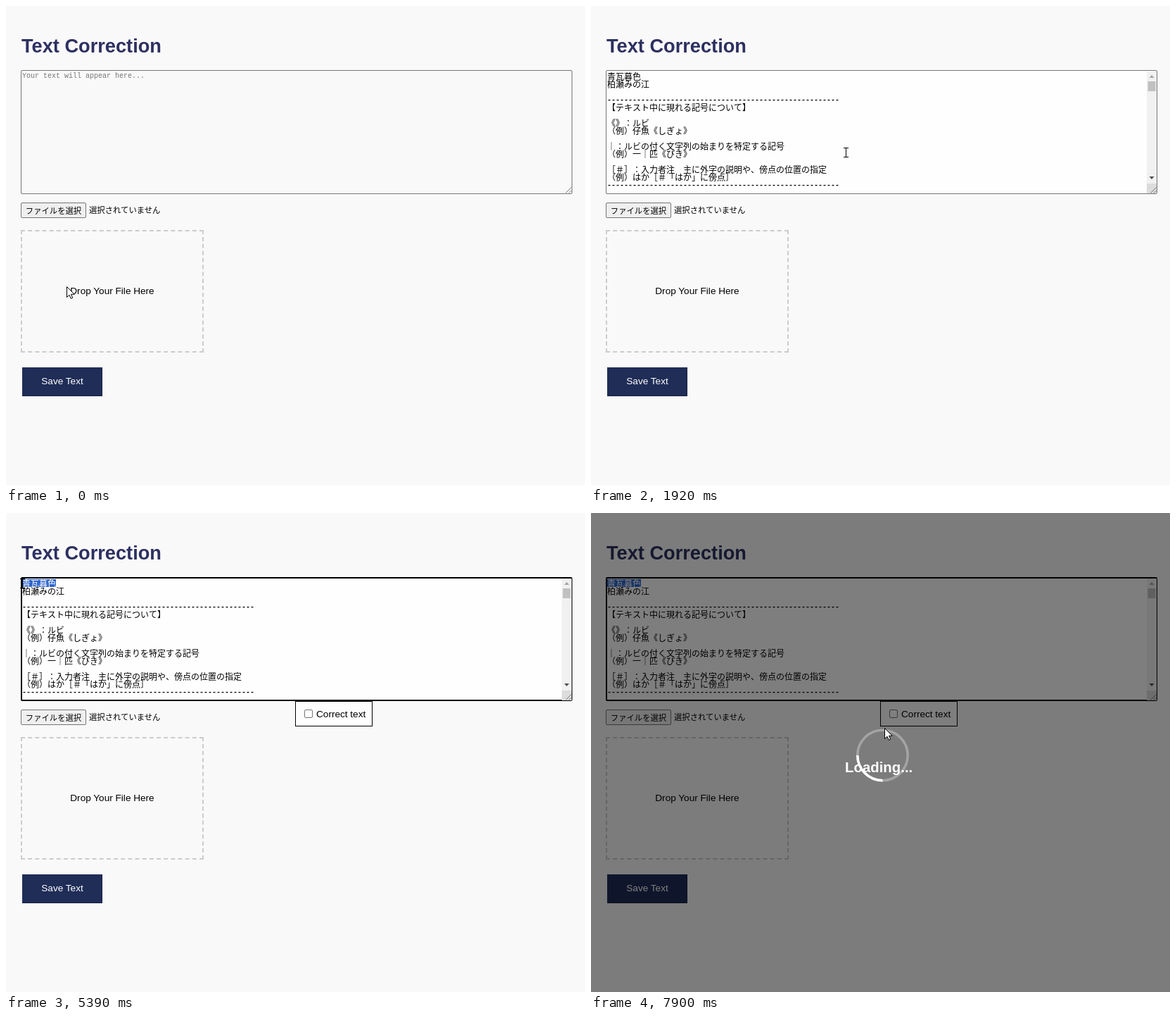
Animation of 823 by 680 pixels, one loop 8 s. Source, as an HTML page:

```html
<!DOCTYPE html>
<html lang="ja">
<head>
<meta charset="utf-8">
<title>Text Correction</title>
<style>
  html, body { margin: 0; width: 100%; height: 100%; overflow: hidden; background: #f9f9f9; }
  body { position: relative; color: #000; font: 13.6px "Liberation Sans", Arial, sans-serif; }
  body div, body svg { position: absolute; box-sizing: border-box; white-space: pre; }
  .ja { font-family: "Noto Sans CJK JP", "Noto Sans CJK", sans-serif; font-size: 11.35px; }
  .mono { font: 10px/11px "Liberation Mono", monospace; }

  #title { left: 22px; top: 36px; font-size: 27.2px; font-weight: bold; line-height: 41px; color: #2d3061; }
  #area { left: 21px; top: 91px; width: 784px; height: 176px; border: 1px solid #767676; border-radius: 2px; }
  #area.filled { background: #fefefe; }
  #area.focused { border: 2px solid #000; }
  #hint { left: 23px; top: 94px; color: #757575; }
  #text { left: 23px; top: 94px; font-size: 12px; line-height: 11px;
          font-kerning: none; text-spacing-trim: space-all; }
  #text div { left: 0; height: 11px; }
  #text .mono { font-weight: bold; }
  #text span { display: inline-block; width: 12px; height: 11px; }
  #text span.picked { background: #2f66cc; color: #fff; }

  #file { left: 21px; top: 279px; width: 93px; height: 22px; line-height: 20px; text-align: center;
          background: #efefef; border: 1px solid #767676; border-radius: 2px; }
  #status { left: 118px; top: 279px; line-height: 21px; }
  #drop { left: 21px; top: 318px; width: 260px; height: 174px; border: 2px dashed #ccc;
          line-height: 170px; text-align: center; }
  #save { left: 23px; top: 513px; width: 114px; height: 41px; line-height: 40px; text-align: center;
          background: #1f2d57; color: #fff; box-shadow: inset -1px -1px #162145; }

  #dialog { left: 218px; top: 0; width: 384px; height: 80px; background: #292a2d; color: #e8eaed;
            border-radius: 0 0 5px 5px; box-shadow: 0 1px 4px rgba(0, 0, 0, .5);
            font-family: "Open Sans", sans-serif; font-size: 10.75px; }
  #message { left: 14px; top: 7px; line-height: 20px; }
  #ok { left: 317px; top: 40px; width: 50px; height: 25px; line-height: 25px; text-align: center;
        background: #8ab4f8; color: #202124; border-radius: 3px;
        box-shadow: 0 0 0 1px #202124, 0 0 0 3px #5689dc; }

  #popup { left: 411px; top: 267px; width: 110px; height: 36px; background: #fdfdfd; border: 1px solid #000; }
  #box { left: 12px; top: 11px; width: 12px; height: 12px; border: 1px solid #767676; border-radius: 2px; background: #fff; }
  #label { left: 29px; top: 7px; line-height: 21px; }

  #overlay { inset: 0; background: rgba(0, 0, 0, .5); }
  #spinner { left: 376px; top: 306px; }
  #loading { left: 361px; top: 346px; line-height: 30px; font-size: 20.4px; font-weight: bold; color: #fff; }
  #cursor { left: 0; top: 0; overflow: visible; }
</style>
</head>
<body>
<div id="title">Text Correction</div>
<div id="area"></div>
<div id="hint" class="mono">Your text will appear here...</div>
<div id="text" class="ja"></div>
<svg style="left:790px;top:93px" width="14" height="173">
  <g id="scrollbar">
    <path fill="#f1f1f1" d="M0 0h14v159h-14z"/>
    <path fill="#c1c1c1" d="M1.5 14h11v14h-11z"/>
    <path fill="#a3a3a3" d="M3.5 9l3.5-4 3.5 4z"/>
    <path fill="#505050" d="M3.5 149l3.5 4 3.5-4z"/>
    <path fill="#dcdcdc" d="M0 159h14v14h-14z"/>
  </g>
  <path stroke="#777" d="M5.5 172.5l8-8M10 172.5l3.5-3.5"/>
</svg>
<div id="file" class="ja">ファイルを選択</div>
<div id="status" class="ja">選択されていません</div>
<div id="drop">Drop Your File Here</div>
<div id="save">Save Text</div>
<div id="popup"><div id="box"></div><div id="label">Correct text</div></div>
<div id="dialog"><div id="message">Detected encoding: SHIFT_JIS</div><div id="ok">OK</div></div>
<div id="overlay">
  <svg id="spinner" width="77" height="77" fill="none" stroke="#fff" stroke-width="3.6">
    <circle cx="38.5" cy="38" r="35.7" stroke-opacity=".3"/>
    <circle id="arc" cx="38.5" cy="38" r="35.7" pathLength="4" stroke-dasharray="1 3"/>
  </svg>
  <div id="loading">Loading...</div>
</div>
<svg id="cursor" width="1" height="1">
  <path id="arrow" fill="#fff" stroke="#000" d="M.5 .5V15.5L4 12.2L6.3 17.3L8.7 16.3L6.5 11.3H11.2Z"/>
  <path id="beam" fill="none" stroke="#000" d="M-3 -6.5H4M.5 -6V6M-3 6.5H4"/>
</svg>
<script>
const LOOP = 8000, TICK = 130;
const $ = id => document.getElementById(id);
const show = (id, on) => { $(id).style.display = on ? "" : "none"; };
const easeOut = k => 1 - (1 - k) ** 3;
const progress = (t, start, end) => Math.min(1, Math.max(0, (t - start) / (end - start)));
// The screen refreshes in coarse steps, so motion is held between ticks.
const ticks = (t, origin) => Math.floor((t - origin) / TICK);

const rule = "-".repeat(55);
const lines = [
  "青瓦暮色", "柏瀬みの江", "", rule, "【テキスト中に現れる記号について】", "",
  "《》：ルビ", "（例）仔魚《しぎょ》", "",
  "｜：ルビの付く文字列の始まりを特定する記号", "（例）一｜匹《ぴき》", "",
  "［＃］：入力者注　主に外字の説明や、傍点の位置の指定", "（例）はか［＃「はか」に傍点］", rule
];
lines.forEach((line, i) => {
  const row = document.createElement("div");
  row.style.top = i * 11 + (line === rule ? 1 : 0) + "px";
  if (line === rule) row.className = "mono";
  if (i === 0) row.innerHTML = [...line].map(c => `<span>${c}</span>`).join("");
  else row.textContent = line;
  $("text").append(row);
});
const headingChars = [...$("text").querySelectorAll("span")];

const home = { x: 86, y: 398 };
const toOk = { start: 650, end: 1110, x: 529, y: 64 };
const press = { start: 1240, end: 1370, x: 545, y: 52 };
const toArea = { start: 1500, end: 1890, x: 362, y: 208 };
const toHeading = { start: 1890, end: 2540, x: 95, y: 131 };
const aim = { start: 2850, end: 3580, x: 70, y: 100 };
const drag = { start: 4200, end: 4690, x: 23, y: 100 };
const toPopup = { start: 5300, end: 5790, x: 436, y: 279 };
const toBox = { start: 5790, end: 6300, x: 427, y: 284 };
const leave = { start: 6800, end: 7250, x: 417, y: 305 };
const moves = [toOk, press, toArea, toHeading, aim, drag, toPopup, toBox, leave];

function pointerAt(t) {
  let { x, y } = home;
  for (const move of moves) {
    const k = easeOut(progress(t, move.start, move.end));
    x += (move.x - x) * k;
    y += (move.y - y) * k;
  }
  return { x: Math.round(x), y: Math.round(y) };
}

function draw(now) {
  const t = now % LOOP;
  const filled = t >= 1650, loading = t >= 6730;

  show("dialog", t >= 280 && t < 1520);
  show("hint", !filled);
  show("text", filled);
  show("scrollbar", filled);
  show("popup", t >= 5090);
  show("overlay", loading);
  $("area").classList.toggle("filled", filled);
  $("area").classList.toggle("focused", t >= 3870);

  const held = ticks(t, 70) * TICK + 70;
  const { x, y } = pointerAt(held);
  const overText = filled && !loading && y > 91 && y < 267;
  show("arrow", !overText);
  show("beam", overText);
  $("cursor").style.transform = `translate(${x}px, ${y}px)`;

  const dragX = pointerAt(Math.min(held, drag.end)).x;
  headingChars.forEach((c, i) =>
    c.classList.toggle("picked", held >= drag.start && dragX <= 29 + i * 12));

  $("arc").setAttribute("transform", `rotate(${ticks(t, 6730) * 25 - 135} 38.5 38)`);
  requestAnimationFrame(draw);
}
draw(performance.now());
</script>
</body>
</html>
```
